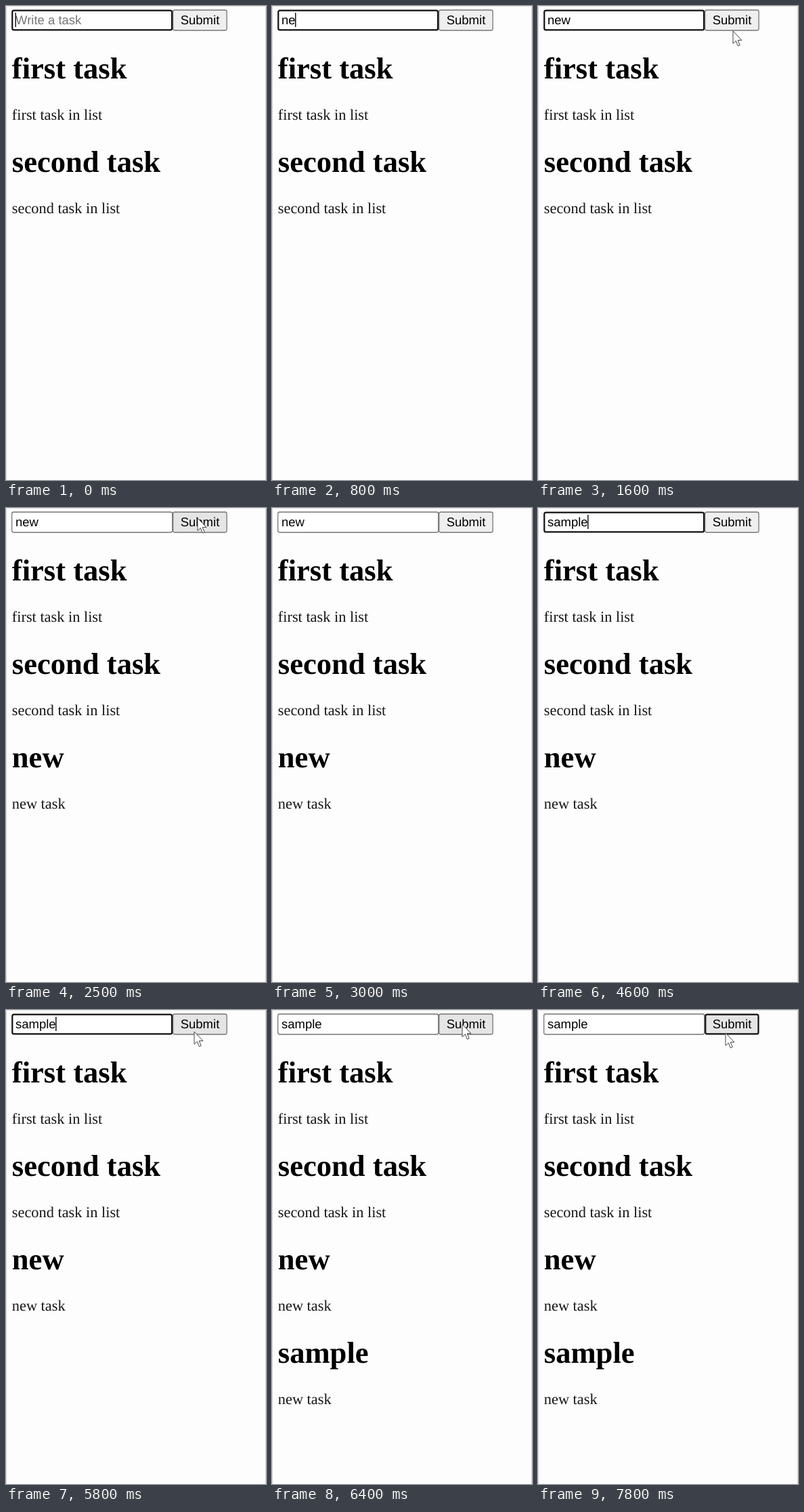
Recreate the animation shown at these times as an HTML page. Size 384x700 px, loop 8000 ms.

```html
<!DOCTYPE html>
<html lang="en">
<head>
<meta charset="utf-8">
<title>Task list</title>
<style>
  html, body { margin: 0; width: 100%; height: 100%; overflow: hidden; background: #fdfdfd; }
  svg { display: block; width: 384px; height: 700px; }
  text { text-rendering: geometricPrecision; }
  .ui { font: 18.5px "Liberation Sans", Arial, sans-serif; }
  .list { font: 22.35px "Liberation Serif", "Times New Roman", serif; fill: #161616; }
  .head { font-size: 44.6px; font-weight: bold; fill: #000; }
</style>
</head>
<body>
<svg viewBox="0 0 384 700">
  <path d="M.5 0V700M383.5 0V700" stroke="#d2d2d2"/>
  <path d="M0 .5H384" stroke="#e6e6e6"/>
  <g class="ui">
    <rect id="field" fill="#fff"/>
    <rect id="button"/>
    <rect id="mark" x="14" y="10" width="34" height="21" fill="#0078d7"/>
    <text id="value" x="14" y="27"></text>
    <path id="caret" stroke="#000" stroke-width="1.4"/>
    <text x="257.7" y="27">Submit</text>
  </g>
  <g id="list" class="list"></g>
  <path id="arrow" d="M0 0V18.5L4.4 14.5 7.3 22 10.2 20.8 7.2 13.6H13Z" fill="#fff" stroke="#444" stroke-linejoin="round"/>
</svg>
<script>
const LOOP = 8000, TICK = 100;
const PACE = 140;    // between keystrokes
const BLINK = 530;   // half a caret period
const PRESS = 150;   // mouse button down
const PITCH = 137.9; // between list items

// Each round: focus the field, type a word, go to the button and press it.
// Pointer path: [time, x, y]
const rounds = [
  { focus: -200, key: 600, word: "new", press: 2000, leave: 2800,
    path: [[1400, 232, 36], [1600, 288, 37], [1900, 283, 15], [2500, 283, 15], [2800, 262, 51]] },
  { focus: 3200, key: 3900, word: "sample", press: 6200, leave: LOOP,
    path: [[5200, 225, 48], [5800, 278, 32], [6300, 282, 18], [6800, 277, 34]] }
];

const el = id => document.getElementById(id);
const set = (node, attrs) => {
  for (const k in attrs) node.setAttribute(k, attrs[k]);
};
const show = (node, on) => node.style.display = on ? "" : "none";
const within = (t, a, b) => t >= a && t < b;

const tasks = [
  ["first task", "first task in list", 0],
  ["second task", "second task in list", 0],
  ...rounds.map(r => [r.word, "new task", r.press + PRESS])
].map(([title, text, start], i) => {
  const g = document.createElementNS("http://www.w3.org/2000/svg", "g");
  set(g, { transform: `translate(8.8 ${PITCH * i})` });
  g.innerHTML = `<text class="head" y="107.2">${title}</text><text y="168.3">${text}</text>`;
  el("list").append(g);
  return { g, start };
});

function pointer(t) {
  const round = rounds.find(r => within(t, r.path[0][0], r.leave));
  if (!round) return null;
  const i = round.path.findLastIndex(p => p[0] <= t);
  const a = round.path[i], b = round.path[i + 1] || a;
  const k = (t - a[0]) / (b[0] - a[0] || 1);
  return [1, 2].map(n => a[n] + (b[n] - a[n]) * k);
}

function box(node, x, width, focused) {
  const d = focused ? .6 : 0;
  set(node, {
    x: x + d, y: 6 + d, width: width - 2 * d, height: 30 - 2 * d, rx: 2.4,
    stroke: focused ? "#101010" : "#767676",
    "stroke-width": focused ? 2.2 : 1.3
  });
}

function draw(now) {
  const t = Math.floor(now % LOOP / TICK) * TICK;
  const typed = rounds.findLast(r => r.key <= t);
  const count = typed ? Math.min(typed.word.length, Math.floor((t - typed.key) / PACE) + 1) : 0;
  const text = typed ? typed.word.slice(0, count) : "";
  const lastKey = typed ? typed.key + (count - 1) * PACE : -LOOP;

  const active = rounds.find(r => within(t, r.focus, r.press));
  const selected = text && rounds.some(r => within(t, r.key - 300, r.key));
  const idle = active ? t - Math.max(active.focus, lastKey) : 0;
  const pressed = rounds.some(r => within(t, r.press, r.press + PRESS));
  const p = pointer(t);
  const hover = p && p[0] > 246 && p[1] < 36;

  box(el("field"), 8.7, 237, active);
  box(el("button"), 246.7, 79.4, t >= 7700);
  set(el("button"), { fill: pressed ? "#f5f5f5" : hover ? "#e5e5e5" : "#efefef" });

  el("value").textContent = text || "Write a task";
  set(el("value"), { fill: selected ? "#fff" : text ? "#000" : "#757575" });
  show(el("mark"), selected);
  const end = 14.2 + (text ? el("value").getComputedTextLength() : 0);
  set(el("caret"), { d: `M${end} 10V31` });
  show(el("caret"), active && !selected && idle % (2 * BLINK) < BLINK);

  tasks.forEach(task => show(task.g, t >= task.start));
  show(el("arrow"), p);
  if (p) set(el("arrow"), { transform: `translate(${p})` });
}

const begin = performance.now();
function frame() {
  draw(performance.now() - begin);
  requestAnimationFrame(frame);
}
frame();
</script>
</body>
</html>
```
